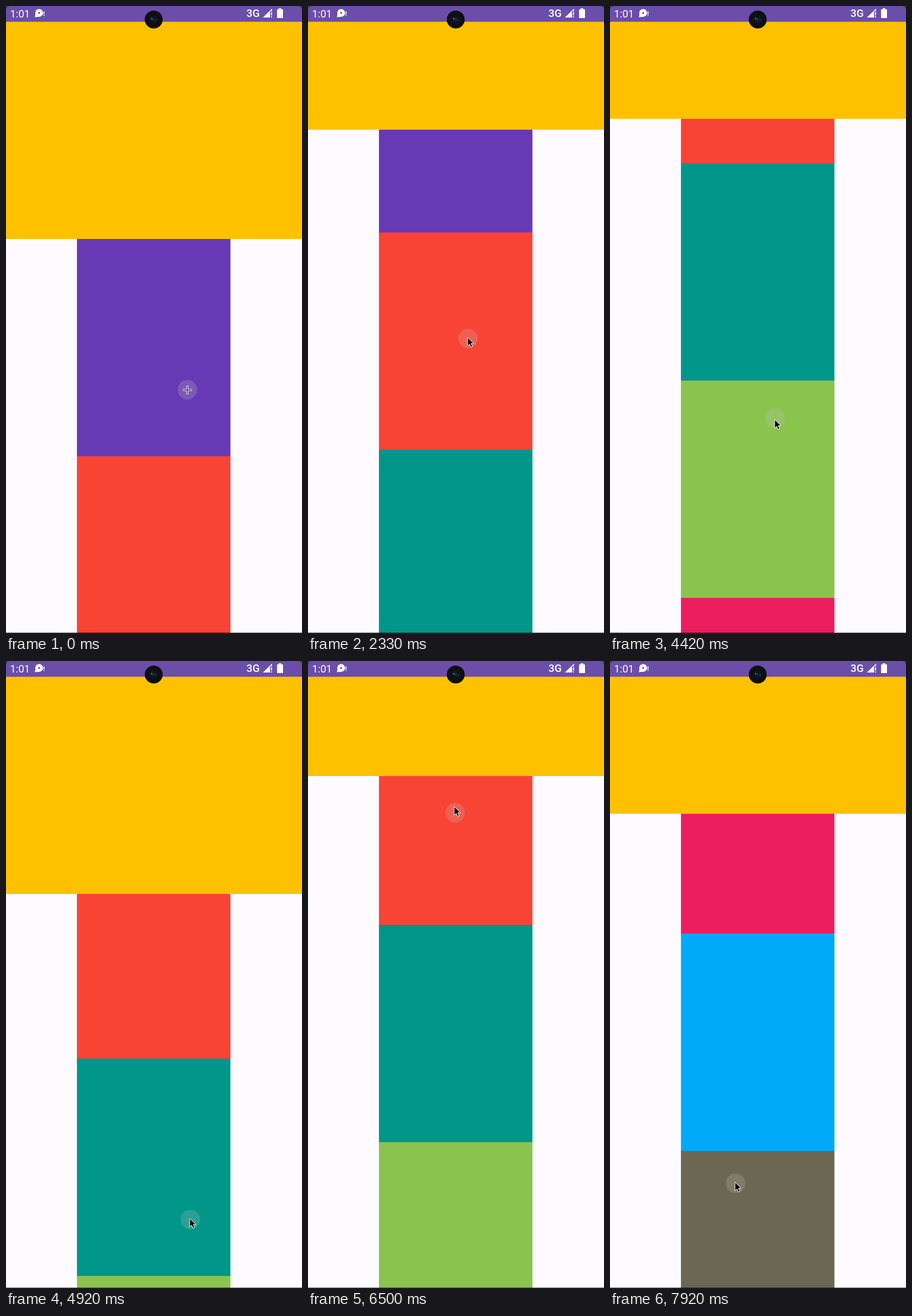
These frames come from a looping animation (514 px wide and 1090 px high, 8 s). An HTML page:

```html
<!DOCTYPE html>
<html lang="en">
<head>
<meta charset="utf-8">
<title>Collapsing header</title>
<style>
  html, body { margin: 0; width: 100%; height: 100%; overflow: hidden; background: #fdfbff; }
  svg { display: block; width: 514px; height: 1090px; }
</style>
</head>
<body>
<svg viewBox="0 0 514 1090">
  <defs>
    <radialGradient id="lens">
      <stop offset="0" stop-color="#26334d"/>
      <stop offset=".35" stop-color="#10151f"/>
      <stop offset="1" stop-color="#0e0f11"/>
    </radialGradient>
  </defs>
  <rect width="514" height="1090" fill="#fdfbff"/>
  <g id="list"></g>
  <rect id="bar" width="514" fill="#fdc100"/>
  <rect y="1089" width="514" height="1" fill-opacity=".5"/>

  <rect width="514" height="27.4" fill="#6a4ea9"/>
  <path d="M0 0H7Q2 1 0 6ZM514 0H507Q512 1 514 6Z" fill="#4a4648"/>
  <g fill="#fff" font-family="Roboto, sans-serif">
    <text x="7" y="19.500" font-size="18">1:01</text>
    <text x="417.500" y="19" font-size="18.500" font-weight="500">3G</text>
    <circle cx="57.500" cy="12" r="6.800"/>
    <path d="M51.500 13L50 19.500L58 18.500Z"/>
    <path d="M65.200 9.500h1.600v5h-1.600zM65.200 15.500h1.600v1.700h-1.600z"/>
    <path d="M446 20L462 4.500V9H458.500V20ZM460.300 10.500h1.700v6h-1.700zM460.300 18h1.700v2h-1.700z"/>
    <path d="M473.500 4h4.500v1.800h2q1 0 1 1V20q0 1-1 1h-8.300q-1 0-1-1V6.800q0-1 1-1h1.800z"/>
  </g>
  <circle cx="57.500" cy="12" r="1.700" fill="#6a4ea9"/>
  <circle cx="256.500" cy="23.500" r="15.600" fill="#0e0f11"/>
  <circle cx="256.500" cy="23.500" r="10" fill="url(#lens)"/>
  <circle cx="253" cy="22" r="1.500" fill="#4d6a9a"/>
  <circle cx="261" cy="24.500" r="1" fill="#33496f"/>

  <circle id="touch" r="17" fill="#cdc3c3" fill-opacity=".22"/>
  <path id="arrow" d="M0 0V15L3.500 11.800L6 17.200L8.600 16L6.200 10.800H11Z" stroke="#fff"/>
  <g id="cross" fill="none" transform="translate(315 667.500)">
    <path d="M-7.500 0H7.500M0-7.500V7.500" stroke="#fff" stroke-width="3.400"/>
    <path d="M-6.800 0H6.800M0-6.800V6.800" stroke="#2b2140" stroke-width="1.300"/>
  </g>
</svg>
<script>
const LOOP = 8000, FPS = 12, HEIGHT = 1090;
const EXPANDED = 405, COLLAPSED = 82, BLOCK = 377.7;
const COLORS = ['#6839b4', '#f74435', '#009689', '#8bc34f', '#eb1e60', '#02a9fb', '#6c6752'];

// Each move: start, end, value(s) reached; the value rests in between
const header = [
  [670, 1000, 401], [1170, 1500, 331], [1580, 2330, 215], [2420, 3000, COLLAPSED],
  [4080, 4920, EXPANDED], [4920, 5580, COLLAPSED],
  [5630, 6170, 379], [6170, 6750, COLLAPSED], [7500, 7920, 265.6]
];
const fling = [[1580, 2330, 9], [2420, 4000, 469], [4920, 5580, 227], [6280, 7920, 1540.6]];
const pointer = [
  [670, 2330, 278, 578], [2420, 3250, 268, 577], [4080, 4920, 320, 971], [4920, 5580, 269, 419],
  [5630, 6170, 290, 717], [6170, 6600, 250, 192], [6600, 7500, 222, 740], [7500, 7920, 218, 908]
];

function follow(moves, t, start) {
  return moves.reduce((now, [from, to, ...goal]) => {
    const u = Math.min(1, Math.max(0, (t - from) / (to - from)));
    const ease = u * u * (3 - 2 * u);
    return now.map((v, i) => v + (goal[i] - v) * ease);
  }, start);
}

const $ = id => document.getElementById(id);
const show = (el, on) => el.setAttribute('visibility', on ? 'visible' : 'hidden');
const place = (el, x, y) => el.setAttribute('transform', `translate(${x} ${y})`);

// Every block reaches one pixel under the next, so no seam shows
$('list').innerHTML = COLORS.map((color, i) =>
  `<rect x="123.2" y="${i * BLOCK}" width="266.500" height="${BLOCK + (i < COLORS.length - 1)}" fill="${color}"/>`
).join('');

function draw() {
  const time = performance.now() % LOOP;
  const t = Math.floor((time + 4) * FPS / 1000) * 1000 / FPS;

  // Header and list both take the drag; the list stops at its end
  const [bottom] = follow(header, t, [EXPANDED]);
  const [extra] = follow(fling, t, [0]);
  const end = bottom + COLORS.length * BLOCK - HEIGHT;
  const scroll = Math.min(EXPANDED - bottom + extra, end);
  $('bar').setAttribute('height', bottom);
  place($('list'), 0, bottom - scroll);

  // The cursor runs slightly ahead of the touch dot
  const [x, y] = follow(pointer, t, [315, 667]);
  const [ax, ay] = follow(pointer, t + 7, [315, 667]);
  place($('touch'), x, y);
  place($('arrow'), ax - 1, ay - 2);
  show($('cross'), t < 330);
  show($('arrow'), t >= 330);
  requestAnimationFrame(draw);
}
draw();
</script>
</body>
</html>
```
